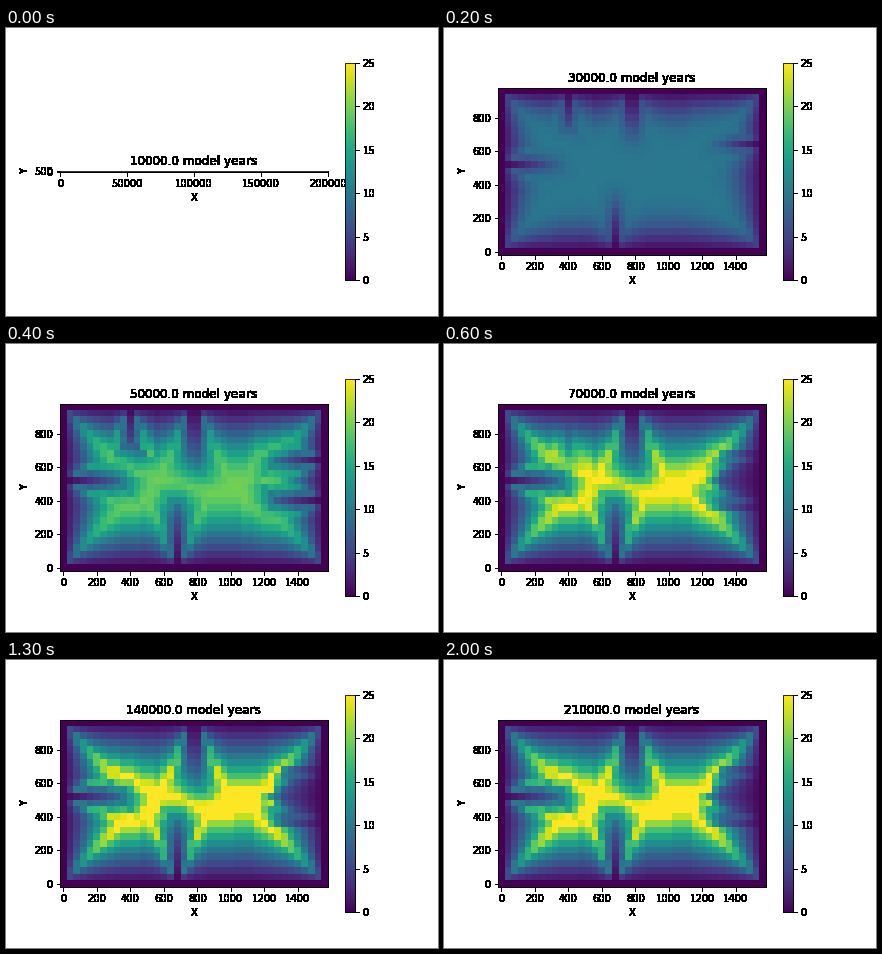
Write a matplotlib script that moves like this. It is 432x288 px and loops after 2.1 s.

```python
import matplotlib.pyplot as plt
import numpy as np
from matplotlib.animation import FuncAnimation

plt.rcParams.update({
    "figure.dpi": 72,
    "font.family": "DejaVu Sans",
    "font.size": 10,
    "figure.subplot.bottom": 0.125,
})

FRAMES = 21
SETTLED = 12                 # the surface is steady after this many steps
ROWS, COLS, DX = 25, 40, 40
UPLIFT = 5.0                 # rise per step
ERODE = 0.86                 # stream power per step, in cells
SUBSTEPS = 20
EXTENT = (-DX / 2, (COLS - 0.5) * DX, -DX / 2, (ROWS - 0.5) * DX)

STEPS = [(-1, 0), (1, 0), (0, -1), (0, 1),
         (-1, -1), (-1, 1), (1, -1), (1, 1)]

# Valleys: rows, columns, first step, last step
VALLEYS = [
    (slice(13, 14), slice(1, 9), 1, 99),
    (slice(15, 24), slice(19, 21), 2, 99),
    (slice(1, 10), slice(17, 18), 2, 99),
    (slice(19, 24), slice(10, 11), 2, 4),
    (slice(16, 17), slice(32, 39), 2, 4),
    (slice(10, 11), slice(32, 39), 3, 4),
]
BASIN = (slice(10, 17), slice(33, 39))   # soft eastern block
BASIN_START = 5


def ground(step):
    """Travel cost and erodibility of each cell."""
    cost, soft = np.ones((ROWS, COLS)), np.ones((ROWS, COLS))
    for rows, cols, first, last in VALLEYS:
        if first <= step <= last:
            cost[rows, cols] = 0.7
    if step >= BASIN_START:
        cost[BASIN], soft[BASIN] = 1.3, 2.5
    return cost, soft


def drainage(step):
    """Cells in downstream-first order as (cell, receiver, erosion rate)."""
    cost, soft = ground(step)
    dist = np.full((ROWS, COLS), 1e6)
    edge = np.ones((ROWS, COLS), bool)
    edge[1:-1, 1:-1] = False
    dist[edge] = 0
    for _ in range(50):
        ways = np.array([np.roll(dist, (-dr, -dc), (0, 1)) + cost * np.hypot(dr, dc)
                         for dr, dc in STEPS])
        dist = np.where(edge, 0, ways.min(0))
    way = ways.argmin(0).ravel()

    order = [k for k in np.argsort(dist.ravel(), kind="stable")
             if not edge.flat[k]]
    area = np.ones(ROWS * COLS)
    receiver = {}
    for k in reversed(order):
        dr, dc = STEPS[way[k]]
        receiver[k] = k + dr * COLS + dc
        area[receiver[k]] += area[k]
    return [(k, receiver[k],
             ERODE * soft.flat[k] * area[k] ** 0.5 / np.hypot(*STEPS[way[k]]))
            for k in order]


def evolve():
    """Elevation after each step of uplift and implicit river erosion."""
    z = [0.0] * (ROWS * COLS)
    surfaces = [np.zeros((ROWS, COLS))]
    h = 1 / SUBSTEPS
    for step in range(1, SETTLED + 1):
        flow = drainage(step)
        for _ in range(SUBSTEPS):
            for k, down, rate in flow:
                f = rate * h
                z[k] = (z[k] + UPLIFT * h + f * z[down]) / (1 + f)
        surfaces.append(np.reshape(z, (ROWS, COLS)))
    return surfaces


def harden(image, dpi):
    """Make every touched pixel opaque, for crisp black lettering."""
    image[..., 3] = image[..., 3] > 0
    return image, 0, 0


surfaces = evolve()

fig, ax = plt.subplots(figsize=(6, 4), dpi=72)
terrain = ax.imshow(surfaces[0], cmap="viridis", vmin=0, vmax=25,
                    origin="lower", extent=EXTENT, interpolation="nearest")
bar = fig.colorbar(terrain, ax=ax, ticks=range(0, 26, 5))
ax.set_xlabel("X")
ax.set_ylabel("Y")
title = ax.set_title("", fontsize=12)
for panel in (ax, bar.ax):
    panel.set_agg_filter(harden)


def update(i):
    flat = i == 0
    terrain.set_visible(not flat)
    terrain.set_data(surfaces[min(i, SETTLED)])
    ax.set_xticks(range(0, 200001, 50000) if flat else range(0, 1401, 200))
    ax.set_yticks([0, 500] if flat else range(0, 801, 200))
    ax.set_xlim((0, 200000) if flat else EXTENT[:2])
    ax.set_ylim(EXTENT[2:])
    title.set_text(f"{(i + 1) * 1e4} model years")
    return terrain, title


anim = FuncAnimation(fig, update, frames=FRAMES, interval=100,
                     repeat=True, repeat_delay=0, blit=False)
plt.show()
```
